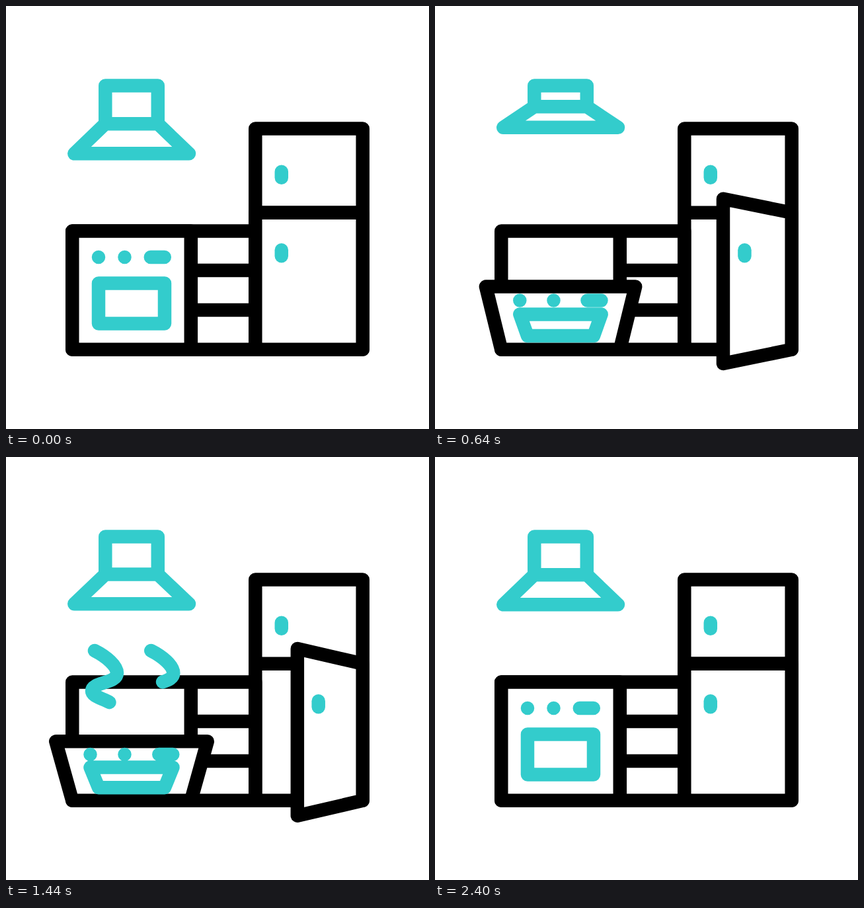
Recreate the animation shown at these times as an HTML page. Size 640 px wide and 640 px high, loop 2.64 s.

```html
<!DOCTYPE html>
<html lang="en">
<head>
<meta charset="utf-8">
<title>Kitchen</title>
<style>
html, body { margin: 0; width: 100%; height: 100%; overflow: hidden; background: #fff; }
svg { display: block; width: 100vw; height: 100vh; }
path { fill: none; stroke: #000; stroke-width: 20.5; stroke-linecap: round; stroke-linejoin: round; }
.teal { stroke: #33cccc; }
.panel { fill: #fff; }
</style>
</head>
<body>
<svg viewBox="0 0 640 640">
  <path d="M100.3 340.6H377.3V519.8H100.3ZM279.8 340.6V519.8M279.8 400H377.3M279.8 460H377.3"/>
  <path d="M377.3 185.6H539.7V519.8H377.3ZM377.3 312.8H539.7"/>
  <path class="teal" d="M416.8 250.8V259.7"/>
  <path class="teal" id="hood"/>
  <path class="teal" id="steamL" d="M134 293C152 302 168 316 168 327C168 343 130 340 130 354C130 366 165.500 367 165.500 383C165.500 397 127.500 395 127.500 408C127.500 420 150 426 155 440"/>
  <path class="teal" id="steamR" transform="translate(85.3 0)"/>
  <path class="panel" id="oven"/>
  <path class="teal" id="controls"/>
  <path class="panel" id="fridge"/>
  <path class="teal" id="handle"/>
</svg>
<script>
const LOOP = 2640, STEP = 40, END = 2400;
const $ = id => document.getElementById(id);
const draw = (id, d) => $(id).setAttribute('d', d);

// [time, value] pairs, eased in and out between neighbours
const HOOD = [[0, 0], [600, 39.5], [800, 39.5], [1400, 0], [1800, 39.5], [2400, 0]];
const OVEN = [[120, 0], [735, 1], [1580, 1], [2225, 0]];
const FRIDGE = [[240, 0], [740, 65.5], [1200, 68.5], [1370, 68.5], [1795, 0]];
const HEAD = [[600, 1], [1210, 0]];
const TAIL = [[690, 1], [1870, 0]];
const LAG = 200;

function track(keys, t) {
  if (t <= keys[0][0]) return keys[0][1];
  for (let i = 1; i < keys.length; i++) {
    const [t0, a] = keys[i - 1], [t1, b] = keys[i];
    if (t < t1) {
      const x = (t - t0) / (t1 - t0);
      return a + (b - a) * x * x * (3 - 2 * x);
    }
  }
  return keys[keys.length - 1][1];
}

draw('steamR', $('steamL').getAttribute('d'));
const steamLength = $('steamL').getTotalLength();

function steam(id, t) {
  const head = track(HEAD, t) * steamLength;
  const len = track(TAIL, t) * steamLength - head;
  const style = $(id).style;
  style.visibility = len > 0.1 ? 'visible' : 'hidden';
  style.strokeDasharray = `${Math.max(len, 0.1)} 2000`;
  style.strokeDashoffset = -head;
}

function render(t) {
  const lift = track(HOOD, t);
  const neck = 178.2 - lift * 0.655, rim = 223.3 - lift;
  draw('hood', `M150.3 120.4H229.8V${neck}H150.3ZM150.3 ${neck}L103.3 ${rim}H277L229.8 ${neck}`);

  steam('steamR', t);
  steam('steamL', t - LAG);

  const p = track(OVEN, t);
  const top = 340.6 + 89.7 * p, out = 25 * p;
  draw('oven', `M${100.3 - out} ${top}H${279.8 + out}L279.8 519.8H100.3Z`);

  const dx = 12.5 * p, y = 380 + 70 * p;
  const winTop = 419.6 + 50 * p, winBottom = 480.5 + 19.7 * p;
  draw('controls', `M${140 - dx} ${y}h.01M179.5 ${y}h.01M${218.8 + dx} ${y}h21` +
    `M${140 - dx} ${winTop}H${240 + dx}L240 ${winBottom}H140Z`);

  const swing = track(FRIDGE, t), skew = swing * 0.36;
  draw('fridge', `M${377.3 + swing} ${312.8 - skew}L539.7 312.8V519.8L${377.3 + swing} ${519.8 + skew}Z`);
  draw('handle', `M${416.8 + swing * 0.88} 369.3v8.9`);
}

const start = performance.now();
function tick() {
  const t = (performance.now() - start) % LOOP;
  render(Math.min(END, Math.floor(t / STEP) * STEP));
  requestAnimationFrame(tick);
}
tick();
</script>
</body>
</html>
```
